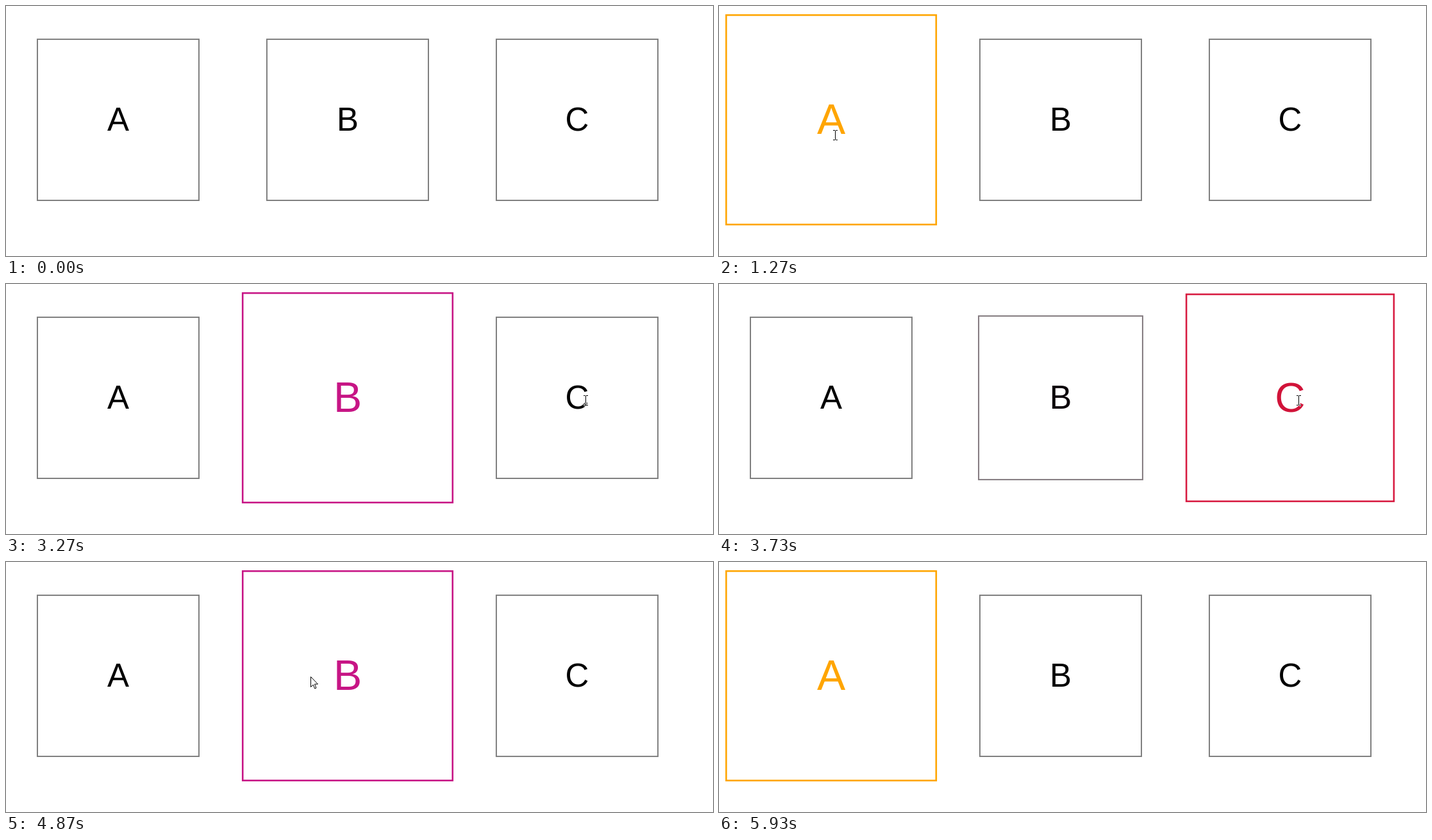
These frames come from a looping animation (1103x391 px, 6.59 s). An HTML page:

```html
<!DOCTYPE html>
<html lang="en">
<head>
<meta charset="utf-8">
<title>Hover boxes</title>
<style>
html, body { margin: 0; width: 100%; height: 100%; overflow: hidden; background: #fff; }
.stage { position: relative; width: 1103px; height: 391px; overflow: hidden; }
.box {
  position: absolute; top: 51px; width: 250px; height: 248px;
  padding-bottom: 2px; border: 2px solid gray; color: #000;
  display: flex; align-items: center; justify-content: center;
  font: 51px "Liberation Sans", Arial, sans-serif;
}
svg { position: absolute; left: 0; top: 0; overflow: visible; visibility: hidden; }
</style>
</head>
<body>
<div class="stage">
  <div class="box">A</div>
  <div class="box">B</div>
  <div class="box">C</div>
  <svg id="arrow" width="12" height="20">
    <path d="M.5 .5V16.5L4.2 13 6.8 19 9 18 6.5 12H11.5Z" fill="#fff" stroke="#000"/>
  </svg>
  <svg id="beam" width="8" height="16" fill="none">
    <path id="bar" d="M-3 -7.5H0M1 -7.5H4M.5 -7V7M-3 7.5H0M1 7.5H4" stroke="#fff" stroke-width="3"/>
    <use href="#bar" stroke="#000"/>
    <path d="M-3 -7.5H0M1 -7.5H4M.5 -7V7M-3 7.5H0M1 7.5H4" stroke="#000"/>
  </svg>
</div>
<script>
const LOOP = 6590, FADE = 300, GROW = 0.3, LEAVE = 5930;
const LEFT = 48, PITCH = 358, HALF = 127, MID = 178;
const GRAY = [128, 128, 128], BLACK = [0, 0, 0];
const ORANGE = [255, 165, 0], VIOLET = [199, 21, 133], CRIMSON = [220, 20, 60];
const COLORS = [ORANGE, VIOLET, CRIMSON];

// [time, box that becomes active]
const SWITCHES = [[960, 0], [2296, 1], [3514, 2], [4585, 1], [5400, 0]];

// The pointer enters at ENTRY and glides: [from ms, to ms, x, y]
const ENTRY = [1000, 385];
const GLIDES = [
  [0, 670, 218, 224],
  [670, 1270, 181, 202],
  [1470, 2070, 534, 196],
  [2800, 3270, 904, 182],
  [3800, 4330, 525, 181],
  [4400, 4870, 475, 179],
  [4870, 5130, 247, 190],
  [5130, 6130, 49, 375]
];

const boxes = [...document.querySelectorAll('.box')];
const arrow = document.getElementById('arrow');
const beam = document.getElementById('beam');
boxes.forEach((box, i) => { box.style.left = `${LEFT + i * PITCH}px`; });

const clamp = x => Math.min(1, Math.max(0, x));
const mix = (a, b, p) => a + (b - a) * p;
const blend = (a, b, p) => `rgb(${a.map((v, i) => Math.round(mix(v, b[i], p)))})`;
const smooth = x => x * x * (3 - 2 * x);

// CSS "ease": cubic-bezier(.25, .1, .25, 1)
function ease(x) {
  let lo = 0, hi = 1;
  for (let i = 0; i < 24; i++) {
    const s = (lo + hi) / 2;
    if (0.75 * (1 - s) * s + s ** 3 < x) lo = s; else hi = s;
  }
  return 0.3 * (1 - lo) ** 2 * lo + 3 * (1 - lo) * lo * lo + lo ** 3;
}

// The picture advances 15 times a second, on a 10 ms clock
const tick = n => 10 * Math.round(n * 20 / 3);
function snap(t) {
  const n = Math.round(t * 3 / 200);
  return tick(tick(n) > t ? n - 1 : n);
}

// How far each box is active, from 0 to 1
function weights(t) {
  const w = [0, 0, 0];
  for (const [at, i] of SWITCHES) {
    if (t < at) break;
    const p = ease(clamp((t - at) / FADE));
    w.forEach((v, j) => { w[j] = mix(v, j === i ? 1 : 0, p); });
  }
  return w;
}

function pointer(t) {
  let [x, y] = ENTRY;
  for (const [from, to, gx, gy] of GLIDES) {
    const p = smooth(clamp((t - from) / (to - from)));
    x = mix(x, gx, p);
    y = mix(y, gy, p);
  }
  return [Math.round(x), Math.round(y)];
}

function show(el, [x, y], on) {
  el.style.visibility = on ? 'visible' : 'hidden';
  el.style.transform = `translate(${x}px, ${y}px)`;
}

function draw(t) {
  const w = weights(t);
  boxes.forEach((box, i) => {
    box.style.transform = w[i] ? `scale(${1 + GROW * w[i]})` : 'none';
    box.style.color = blend(BLACK, COLORS[i], w[i]);
    box.style.borderColor = blend(GRAY, COLORS[i], w[i]);
  });
  const pos = pointer(t);
  const inside = t > 0 && t < LEAVE;
  const overText = w.some((v, i) => {
    const s = 1 + GROW * v, cx = LEFT + HALF + i * PITCH;
    return Math.abs(pos[0] - cx) < 17 * s && Math.abs(pos[1] - MID) < 28 * s;
  });
  show(arrow, pos, inside && !overText);
  show(beam, pos, inside && overText);
}

const start = performance.now();
function frame() {
  draw(snap((performance.now() - start) % LOOP));
  requestAnimationFrame(frame);
}
frame();
</script>
</body>
</html>
```
